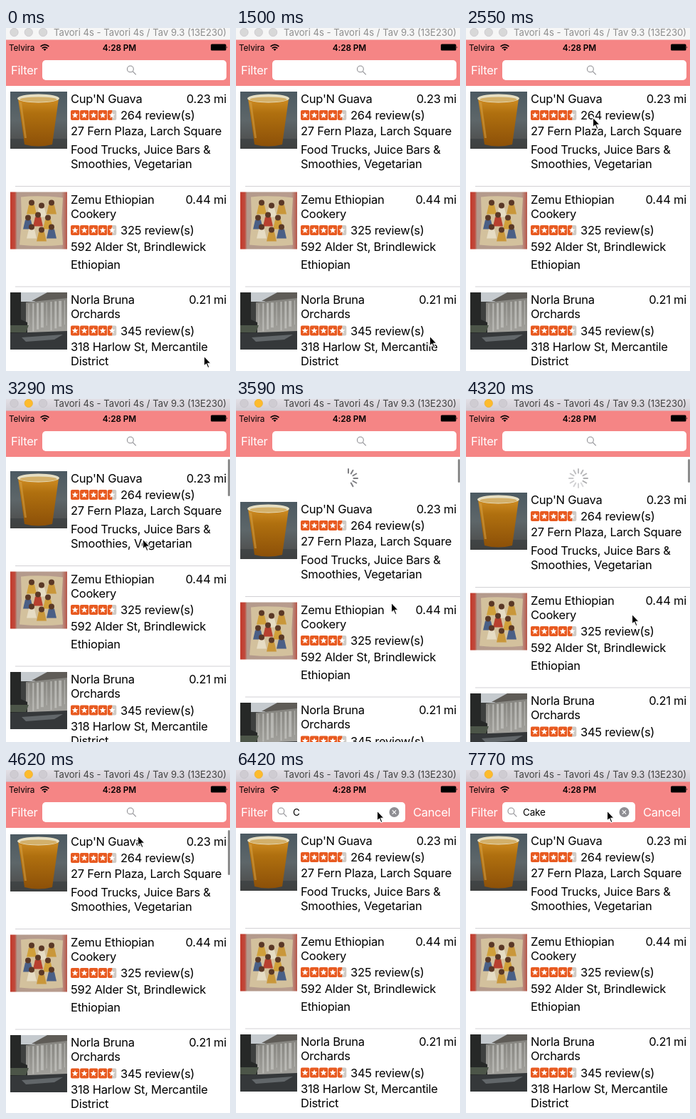
An HTML page for the animation above (8000 ms loop, 315x480 px).

```html
<!DOCTYPE html>
<html lang="en">
<head>
<meta charset="utf-8">
<style>
  html, body { margin: 0; width: 100%; height: 100%; overflow: hidden; background: #fff; }
  svg { display: block; width: 100vw; height: 100vh; }
  text { font: 16.5px Inter, Roboto, sans-serif; letter-spacing: -.25px; white-space: pre; }
  .end { text-anchor: end; }
  .light { fill: #fff; }
  #title { font-size: 13.1px; letter-spacing: 0; }
  .status { font-size: 11.8px; letter-spacing: -.1px; }
  .clock { font-weight: 600; text-anchor: middle; }
  #query { font-size: 13.5px; letter-spacing: -.2px; }
</style>
</head>
<body>
<svg viewBox="0 0 315 480">
  <defs>
    <linearGradient id="bar" x2="0" y2="1"><stop stop-color="#e2dfe5"/><stop offset="1" stop-color="#d0cdd4"/></linearGradient>
    <linearGradient id="wall" x2="0" y2="1"><stop stop-color="#4c5a62"/><stop offset=".5" stop-color="#5d6669"/><stop offset="1" stop-color="#4a4846"/></linearGradient>
    <linearGradient id="juice" x2="0" y2="1"><stop stop-color="#cf8d24"/><stop offset=".3" stop-color="#b0700f"/><stop offset="1" stop-color="#8c5008"/></linearGradient>
    <linearGradient id="cloth" x2="1" y2="0"><stop stop-color="#c23a2c"/><stop offset=".08" stop-color="#c04a3c"/><stop offset=".12" stop-color="#b39a8c"/><stop offset=".9" stop-color="#b89c8e"/><stop offset="1" stop-color="#b8564a"/></linearGradient>
    <linearGradient id="fall" x2="0" y2="1"><stop stop-color="#85847f"/><stop offset="1" stop-color="#a3a29d"/></linearGradient>
    <g id="stars"></g>
    <g id="cup">
      <path fill="url(#wall)" d="M0 0h80v80H0z"/>
      <path fill="#33383a" d="M0 66h80v14H0z" opacity=".5"/>
      <path fill="url(#juice)" d="M11 10H68L59 74Q39 79 20 74Z"/>
      <path fill="#d9a64a" d="M13 15h3l7 50h-3z" opacity=".5"/>
      <ellipse cx="39.5" cy="9.5" rx="29.5" ry="6" fill="#e6dfc4"/>
      <ellipse cx="39.5" cy="11" rx="26" ry="3.6" fill="#d3b06a"/>
    </g>
    <g id="painting">
      <path fill="url(#cloth)" d="M0 0h80v80H0z"/>
      <path fill="#d3c19d" d="M15 7Q40 4 74 8L72 42 74 74Q45 77 13 74L16 40Z"/>
      <g id="figures"></g>
    </g>
    <g id="fountain">
      <path fill="#3f4140" d="M0 0h80v80H0z"/>
      <path fill="#c5cace" d="M15 0h44L34 13H15z"/>
      <path fill="#5f5c57" d="M30 12 52 0H80V14z"/>
      <path fill="url(#fall)" d="M22 14 80 8V56L22 58z"/>
      <g id="streaks" stroke="#c4c4c0" opacity=".75"></g>
      <path fill="#262827" d="M0 0h15v38l9 4v16H0z"/>
      <path fill="#4c5548" d="M0 46h26l-4 10H0z"/>
      <path fill="#35383a" d="M0 57 80 54V80H0z"/>
      <path fill="#62676a" d="M16 63 74 59 62 66 22 69z"/>
    </g>
  </defs>

  <path fill="#fff" d="M0 0h315v480H0z"/>
  <g id="spinner" stroke-width="2" stroke-linecap="round"></g>
  <g id="list"></g>
  <rect id="scroller" x="312" y="84" width="3" rx="1.5" fill="#8c8c8c"/>

  <path fill="#f58585" d="M0 16h315v65H0z"/>
  <path id="titlebar" d="M0 0h315v16.5H0z"/>
  <g id="buttons"></g>
  <text id="title" x="67" y="11">Tavori 4s - Tavori 4s / Tav 9.3 (13E230)</text>

  <text class="status" x="4" y="31.5">Telvira</text>
  <g fill="none" stroke="#000" stroke-width="1.7">
    <path d="M48.6 25.8q5.9-4.8 11.8 0M50.7 28.3q3.8-3 7.6 0"/>
    <path fill="#000" stroke="none" d="M52.4 29.8q2.1-1.5 4.2 0l-2.1 2.2z"/>
  </g>
  <text class="status clock" x="159.5" y="31.5">4:28 PM</text>
  <rect x="288" y="22.5" width="21.5" height="9" rx="1.5"/>
  <path d="M310.5 25.5q1.8 1.5 0 3z"/>

  <text class="light" x="7" y="65">Filter</text>
  <rect id="field" x="51" y="45" height="28" rx="5" fill="#fff"/>
  <g id="lens" fill="none" stroke="#8e8e93" stroke-width="1.1">
    <circle cx="-1.6" cy="-1.6" r="4.4"/><path d="M1.7 1.7 6.3 6.3"/>
  </g>
  <text id="query" x="80" y="63.5"></text>
  <g id="clear" transform="translate(222.5 59)">
    <circle r="7" fill="#8e8e93"/><path d="M-2.6-2.6 2.6 2.6M2.6-2.6-2.6 2.6" stroke="#fff" stroke-width="1.2"/>
  </g>
  <text id="cancel" class="light" y="64.5">Cancel</text>
  <path id="pointer" d="M.5 1V15L3.6 12.2 6 17.6 8 16.7 5.7 11.3H10.2Z" stroke="#fff" stroke-width="1.1"/>
</svg>

<script>
const $ = id => document.getElementById(id);
const set = (id, attrs) => { for (const k in attrs) $(id).setAttribute(k, attrs[k]); };
const repeat = (n, fn) => Array.from({ length: n }, (_, i) => fn(i)).join('');
const LOOP = 8000;

// Rating: four and a half stars
const star = repeat(10, i => {
  const r = i % 2 ? 2 : 4.7, a = (i / 5 - .5) * Math.PI;
  return `${6.1 + r * Math.cos(a)},${7.2 + r * Math.sin(a)} `;
});
$('stars').innerHTML = repeat(5, i => `<g transform="translate(${i * 13})">
  <rect width="12.3" height="14" rx="2" fill="${i < 4 ? '#e85a20' : '#cfcbc6'}"/>
  ${i < 4 ? '' : '<path fill="#e85a20" d="M2 0H6.2V14H2Q0 14 0 12V2Q0 0 2 0"/>'}
  <polygon points="${star}" fill="#fff"/></g>`);

const robes = ['#d0a03a', '#4a5f86', '#e6dcc4', '#b8402f', '#c9973a'];
$('figures').innerHTML = repeat(9, i => {
  const x = 28 + i % 3 * 14 + (i > 2 && i < 6 ? -3 : 2), y = 15 + Math.floor(i / 3) * 17 + i % 2 * 4;
  return `<path fill="${robes[i * 2 % 5]}" d="M${x - 4} ${y + 3}h8l3 13h-14z"/>
    <circle cx="${x}" cy="${y}" r="4" fill="#5a3826"/>`;
});
$('streaks').innerHTML = repeat(9, i =>
  `<path d="M${26 + i * 6.3} ${16 - i * .6}v${32 + i * 7 % 9}" stroke-width="${1 + i * 5 % 4}"/>`);

// Each line is [text, baseline]; all positions are relative to the cell top
const cells = [
  { art: 'cup', name: ["Cup'N Guava"], miles: '0.23', reviews: 264,
    info: [['27 Fern Plaza, Larch Square', 69], ['Food Trucks, Juice Bars &amp;', 95], ['Smoothies, Vegetarian', 115]] },
  { art: 'painting', name: ['Zemu Ethiopian', 'Cookery'], miles: '0.44', reviews: 325,
    info: [['592 Alder St, Brindlewick', 90], ['Ethiopian', 115.5]] },
  { art: 'fountain', name: ['Norla Bruna', 'Orchards'], miles: '0.21', reviews: 345,
    info: [['318 Harlow St, Mercantile', 90], ['District', 110]] },
];
const line = (text, y, x = 91, cls = '') => `<text class="${cls}" x="${x}" y="${y}">${text}</text>`;
$('list').innerHTML = cells.map((c, i) => {
  const drop = (c.name.length - 1) * 20.5;
  return `<g transform="translate(0 ${81 + i * 140.5})">
    <use href="#${c.art}" x="6" y="8"/>
    ${c.name.map((t, n) => line(t, 24 + n * 20.3)).join('')}
    ${line(c.miles + ' mi', 24, 310, 'end')}
    <use href="#stars" x="91" y="${34 + drop}"/>
    ${line(c.reviews + ' review(s)', 47 + drop, 161)}
    ${c.info.map(([t, y]) => line(t, y)).join('')}
    <path d="M13 140.5h302" stroke="#d2d1d5"/></g>`;
}).join('');

// Held poses: [time, pointer x, pointer y, list offset]
const poses = [
  [0, 278, 458, 0], [1500, 272, 430, 0], [1650, 258, 385, 0], [1800, 243, 342, 0], [1950, 235, 327, 0],
  [2250, 214, 255, 0], [2400, 175, 150, 0], [2550, 178, 124, 0],
  [3140, 183, 163, 0], [3290, 192, 195, 12], [3440, 205, 238, 33], [3590, 218, 284, 55],
  [3730, 230, 326, 73], [3880, 240, 365, 90], [4030, 241, 368, 91], [4180, 241, 367, 84],
  [4320, 233, 300, 42], [4470, 208, 175, 8], [4620, 185, 91, 1], [4770, 188, 70, 0],
  [4920, 191, 48, 0], [5070, 194, 30, 0], [5220, 195, 22, 0], [5370, 197, 42, 0], [5520, 198, 56, 0],
];
const typing = [[6420, 'C'], [6570, 'Ca'], [7020, 'Cak'], [7170, 'Cake']];
const latest = (steps, t) => steps.filter(s => s[0] <= t).pop();

function drawWindow(active) {
  set('titlebar', { fill: active ? 'url(#bar)' : '#f6f6f6' });
  set('title', { fill: active ? '#404040' : '#8e8e8e' });
  $('buttons').innerHTML = repeat(3, i => {
    const lit = active && i === 1;
    return `<circle cx="${11.5 + i * 20.3}" cy="6" r="5.7" fill="${lit ? '#fdbb2c' : active ? '#cfccd2' : '#d8d8d8'}"
      stroke="${lit ? '#e8a926' : '#c0bdc3'}" stroke-width=".6"/>`;
  });
}

function drawSpinner(t, offset) {
  const pulling = t < 3880;
  const shown = pulling ? Math.max(0, Math.round((offset - 25) / 65 * 12)) : offset > 30 ? 12 : 0;
  const lead = Math.floor(t / 83);
  $('spinner').innerHTML = repeat(shown, i => {
    const shade = pulling ? 125 : 90 + (lead - i + 120) % 12 * 8;
    return `<path d="M0-7.5V-13" stroke="rgb(${shade},${shade},${shade + 4})" transform="translate(158 111) rotate(${i * 30})"/>`;
  });
  set('spinner', { opacity: t < 4320 ? 1 : .5 });
}

function drawSearch(t) {
  const open = t < 5370 ? 0 : t < 5520 ? .35 : t < 5670 ? .85 : 1;
  const query = latest(typing, t)?.[1] ?? '';
  set('field', { width: 259 - 72 * open });
  set('lens', { transform: `translate(${176.5 - 111.5 * open} 59)` });
  set('cancel', { x: 249 + 70 * (1 - open), opacity: open });
  set('clear', { opacity: query ? 1 : 0 });
  $('query').textContent = query;
}

function draw() {
  const t = performance.now() % LOOP;
  const [, x, y, offset] = latest(poses, t);
  drawWindow(t >= 3140);
  drawSpinner(t, offset);
  drawSearch(t);
  set('list', { transform: `translate(0 ${offset})` });
  set('scroller', {
    height: Math.max(33, 64 - offset),
    opacity: t < 3290 || t >= 5220 ? 0 : t < 5070 ? 1 : .5,
  });
  set('pointer', { transform: `translate(${x} ${y})` });
  requestAnimationFrame(draw);
}
draw();
</script>
</body>
</html>
```
